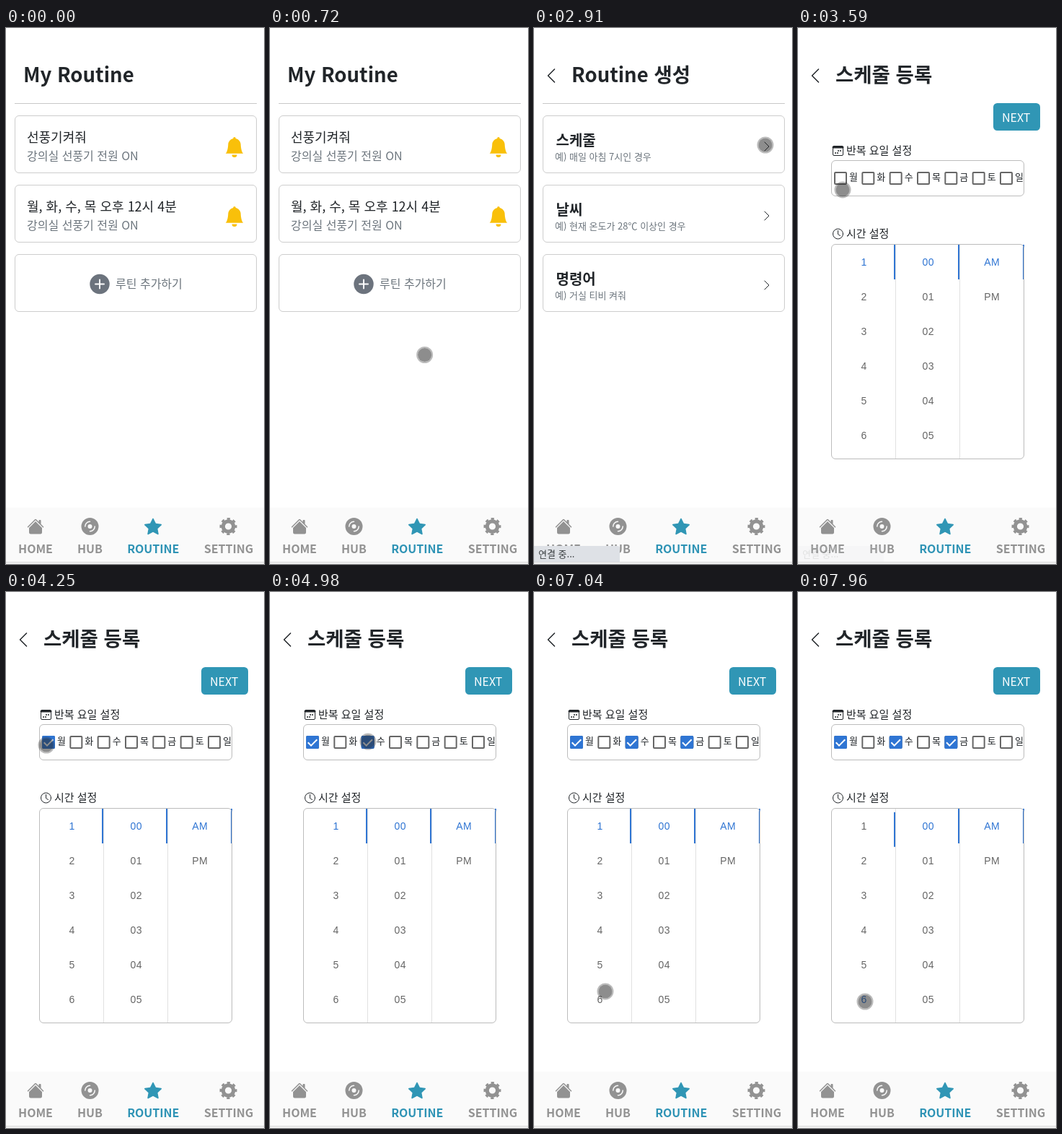
Write an HTML page that moves like this. It is 358 px wide and 742 px high and loops after 8 s.

```html
<!DOCTYPE html>
<html lang="ko">
<head>
<meta charset="utf-8">
<title>My Routine</title>
<style>
  html, body { margin: 0; width: 100%; height: 100%; overflow: hidden; background: #fff; }
  svg { display: block; width: 100%; height: 100%; }
  text { font-family: "Noto Sans CJK KR", "Noto Sans CJK JP", sans-serif; fill: #212529; white-space: pre; }
  .title { font-size: 27.5px; font-weight: 700; }
  .name { font-size: 18px; }
  .kind { font-size: 20px; font-weight: 700; }
  .sub { font-size: 16px; fill: #6c757d; }
  .example { font-size: 13px; fill: #6c757d; }
  .label { font-size: 15px; }
  .day { font-size: 13px; }
  .next { font-size: 16px; fill: #fff; }
  .nav { font-size: 16px; font-weight: 700; fill: #929292; text-anchor: middle; }
  .status { font-size: 13px; fill: #3c4043; }
  .tab { font: 14px "Liberation Sans", sans-serif; letter-spacing: .4px; fill: #666; text-anchor: middle; }
  .nav.on { fill: #2e93b5; }
  .tab.on { fill: #2f75d3; }
  .line { fill: none; stroke: #212529; stroke-linecap: round; stroke-linejoin: round; }
  .card { fill: #fff; stroke: #cdcdcd; }
  .panel { fill: none; stroke: #bcbcbc; }
</style>
</head>
<body>
<svg id="stage" viewBox="0 0 358 742"></svg>
<script>
const BLUE = '#2f75d3', TEAL = '#3096b5', GREY = '#929292';

const text = (x, y, cls, str, id = '') => `<text ${id && `id="${id}"`} x="${x}" y="${y}" class="${cls}">${str}</text>`;
const icon = (x, y, size, fill, d) => `<path transform="translate(${x} ${y}) scale(${size / 16})" fill="${fill}" d="${d}"/>`;
const box = (x, y, w, h, cls, r = 5.5) => `<rect x="${x + .5}" y="${y + .5}" width="${w - 1}" height="${h - 1}" rx="${r}" class="${cls}"/>`;
const line = (d, width = 1) => `<path class="line" stroke-width="${width}" d="${d}"/>`;

const BELL = 'M8 16a2 2 0 0 0 2-2H6a2 2 0 0 0 2 2zm.995-14.901a1 1 0 1 0-1.99 0A5 5 0 0 0 3 6c0 1.098-.5 6-2 7h14c-1.5-1-2-5.902-2-7 0-2.42-1.72-4.44-4.005-4.901z';
const HOUSE = 'm8 3.293 6 6V13.5a1.5 1.5 0 0 1-1.5 1.5h-9A1.5 1.5 0 0 1 2 13.5V9.293zM13 2.5V6l-2-2V2.5a.5.5 0 0 1 .5-.5h1a.5.5 0 0 1 .5.5z' +
  'M7.293 1.5a1 1 0 0 1 1.414 0l6.647 6.646a.5.5 0 0 1-.708.708L8 2.207 1.354 8.854a.5.5 0 1 1-.708-.708z';
const DISC = 'M16 8A8 8 0 1 1 0 8a8 8 0 0 1 16 0zm-6 0a2 2 0 1 0-4 0 2 2 0 0 0 4 0zM4 8a4 4 0 0 1 4-4 .5.5 0 0 0 0-1 5 5 0 0 0-5 5 .5.5 0 0 0 1 0z' +
  'm9 0a.5.5 0 1 0-1 0 4 4 0 0 1-4 4 .5.5 0 0 0 0 1 5 5 0 0 0 5-5z';
const STAR = 'M3.612 15.443c-.386.198-.824-.149-.746-.592l.83-4.73L.173 6.765c-.329-.314-.158-.888.283-.95l4.898-.696L7.538.792c.197-.39.73-.39.927 0' +
  'l2.184 4.327 4.898.696c.441.062.612.636.282.95l-3.522 3.356.83 4.73c.078.443-.36.79-.746.592L8 13.187z';

const cardTop = i => 121 + 96 * i;
const back = line('M28.5 57l-9 9 9 9', 1.5);
const rule = '<path d="M12 104.5H348" stroke="#c8c8c8"/>';

function listPage() {
  const items = ['선풍기켜줘', '월, 화, 수, 목 오후 12시 4분'].map((name, i) => {
    const y = cardTop(i);
    return box(12, y, 336, 80, 'card') + text(29, y + 37, 'name', name) +
      text(29, y + 62, 'sub', '강의실 선풍기 전원 ON') + icon(303, y + 30, 28, '#f9c00a', BELL);
  });
  return text(24, 75, 'title', 'My Routine') + rule + items.join('') + box(12, cardTop(2), 336, 80, 'card') +
    '<circle cx="130" cy="354.5" r="13.7" fill="#6c737d"/><path d="M124 354.5h12m-6-6v12" stroke="#fff" stroke-width="2" stroke-linecap="round"/>' +
    text(152, 360, 'sub', '루틴 추가하기');
}

function kindPage() {
  const kinds = [['스케줄', '매일 아침 7시인 경우'], ['날씨', '현재 온도가 28℃ 이상인 경우'], ['명령어', '거실 티비 켜줘']];
  return back + text(52, 75, 'title', 'Routine 생성') + rule + kinds.map(([kind, example], i) => {
    const y = cardTop(i);
    return box(12, y, 336, 80, 'card') + text(30.5, y + 42, 'kind', kind) +
      text(29, y + 62, 'example', '예) ' + example) + line(`M320 ${y + 37}l6 6-6 6`);
  }).join('');
}

function schedulePage() {
  const days = [...'월화수목금토일'].map((day, i) => {
    const x = 50 + 38.33 * i;
    return `<g transform="translate(${x} 199)"><rect x="1" y="1" width="16" height="16" rx="1" fill="#fff" stroke="#666" stroke-width="2"/>
      <g id="check${i}"><rect width="18" height="18" rx="2" fill="${BLUE}"/><path d="M2.7 9.3l4.3 4.3 8.3-8.3" fill="none" stroke="#fff" stroke-width="2"/></g></g>` +
      text(x + 21, 211, 'day', day);
  }).join('');
  const columns = [[1, 2, 3, 4, 5, 6], ['00', '01', '02', '03', '04', '05'], ['AM', 'PM']].map((values, c) => {
    const right = [135, 224, 314][c];
    const tabs = values.map((v, r) => text([91.5, 180.8, 269.2][c], 328.5 + 48 * r, r ? 'tab' : 'tab on', v, `tab${c}${r}`));
    const divider = c < 2 ? `<path d="M${right + .5} 300V596" stroke="#e0e0e0"/>` : '';
    return divider + tabs.join('') + `<rect id="mark${c}" x="${right - 2}" y="300" width="2" height="48" fill="${BLUE}"/>`;
  }).join('');
  return back + text(52, 75, 'title', '스케줄 등록') +
    `<rect x="271" y="104" width="65" height="38" rx="5.5" fill="${TEAL}"/>` + text(283, 129.5, 'next', 'NEXT') +
    box(48, 163, 15, 14, 'line', 1.5) + line('M49 165h13', 3) +
    '<path d="M51 173h2m1 0h2m-1-3h2m1 0h2" stroke="#212529" stroke-width="1.6"/>' + text(67, 175, 'label', '반복 요일 설정') +
    box(46, 183, 268, 50, 'panel') + days +
    '<circle class="line" cx="55.5" cy="285" r="7"/>' + line('M55.5 280.5v5l3 2') + text(67, 290, 'label', '시간 설정') +
    columns + box(46, 299, 268, 298, 'panel');
}

function navBar() {
  const gear = `<g transform="translate(308.5 690)" fill="none" stroke="${GREY}"><circle r="7.2" stroke-width="5.2"/>
    <circle r="10.6" stroke-width="2.8" stroke-dasharray="4.3 4.025" stroke-dashoffset="2.15"/></g>`;
  return '<rect y="664" width="358" height="78" fill="#fafafa"/><rect y="739" width="358" height="1" fill="#d9d9d9"/><rect y="740" width="358" height="2" fill="#f3f3f3"/>' +
    icon(29, 678, 24, GREY, HOUSE) + icon(104.5, 678, 24, GREY, DISC) + icon(192, 678, 24, TEAL, STAR) + gear +
    text(41, 727, 'nav', 'HOME') + text(116.5, 727, 'nav', 'HUB') + text(204.3, 727, 'nav on', 'ROUTINE') + text(309, 727, 'nav', 'SETTING');
}

const $ = id => document.getElementById(id);
$('stage').innerHTML =
  [listPage, kindPage, schedulePage].map((page, i) => `<g id="page${i}">${page()}</g>`).join('') + navBar() +
  '<g id="status"><path d="M0 717H116a3 3 0 0 1 3 3V739H0z" fill="#dee1e6"/>' + text(6, 732.5, 'status', '연결 중...') + '</g>' +
  '<g id="cursor"><circle r="9.5" fill="#282828" fill-opacity=".53"/><circle r="10.5" fill="none" stroke="#282828" stroke-opacity=".31" stroke-width="2"/></g>';

// Touch pointer: time, x, y
const route = [
  [130, 292, 738], [330, 282, 650], [460, 275, 577], [530, 266, 535], [655, 238, 484], [720, 215, 453],
  [790, 190, 418], [920, 128, 371], [980, 115, 362], [1700, 115, 362], [1950, 135, 353], [2060, 135, 353],
  [2110, 195, 279], [2260, 195, 279], [2600, 318, 262], [2850, 321, 162], [3190, 321, 162], [3320, 265, 167],
  [3540, 70, 222], [3590, 62, 224], [3850, 56, 212], [4400, 56, 212], [4700, 136, 207], [5200, 136, 207],
  [5500, 214, 211], [5950, 214, 211], [6550, 103, 567], [6750, 103, 567], [7040, 99, 553], [7350, 99, 531],
  [7500, 99, 531], [7750, 93, 567]
];
const checkedAt = { 0: 4150, 2: 4830, 4: 5650 };
const LOOP = 8000, KIND = 1310, SCHEDULE = 3190, PICK = 7930;

const clamp = v => Math.max(0, Math.min(1, v));
const show = (id, on) => $(id).style.display = on ? '' : 'none';

function pointerAt(t) {
  const i = route.findIndex(([time]) => time > t);
  if (i < 1) return route[i < 0 ? route.length - 1 : 0].slice(1);
  const [t0, x0, y0] = route[i - 1], [t1, x1, y1] = route[i], u = (t - t0) / (t1 - t0);
  return [x0 + (x1 - x0) * u, y0 + (y1 - y0) * u];
}

function render(now) {
  const t = now % LOOP;
  show('page0', t < KIND);
  show('page1', t >= KIND && t < SCHEDULE);
  show('page2', t >= SCHEDULE);
  show('status', t >= 1400);
  $('status').style.opacity = clamp((3640 - t) / 390);
  for (let i = 0; i < 7; i++) show('check' + i, t >= checkedAt[i]);

  const picked = t >= PICK;
  $('tab00').classList.toggle('on', !picked);
  $('tab05').classList.toggle('on', picked);
  const slide = clamp((Math.min(t, 7960) - PICK) / 300);
  $('mark0').setAttribute('y', 300 + 240 * 2 * slide * slide);

  show('cursor', t >= 130);
  $('cursor').setAttribute('transform', `translate(${pointerAt(t)})`);
}

const start = performance.now();
(function frame() {
  render(performance.now() - start);
  requestAnimationFrame(frame);
})();
</script>
</body>
</html>
```
